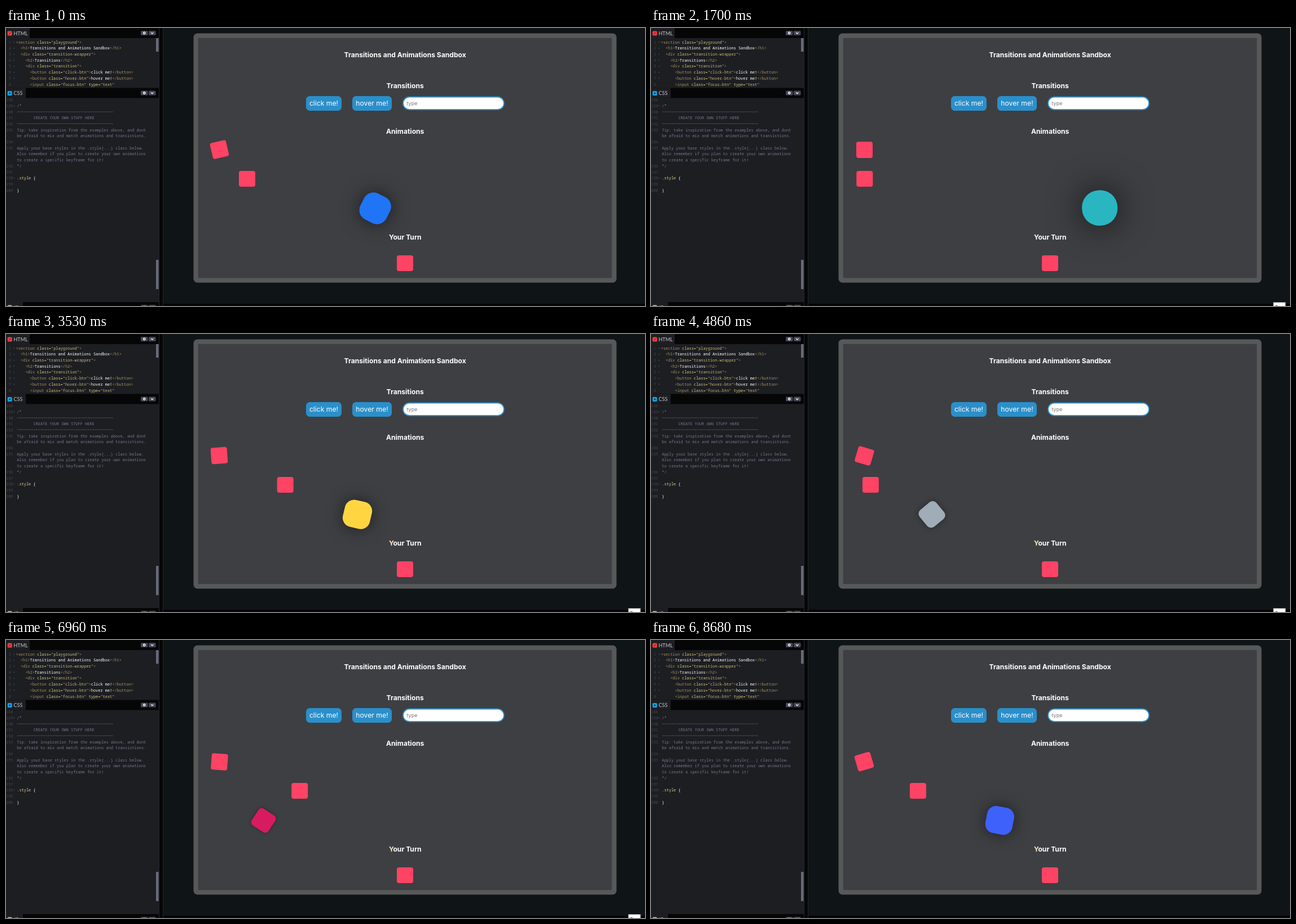
Animation of 1133 by 494 pixels, one loop 8.7 s. Source, as an HTML page:

```html
<!DOCTYPE html>
<html lang="en">
<head>
<meta charset="utf-8">
<title>Transitions and Animations Sandbox</title>
<style>
html, body { margin: 0; width: 100%; height: 100%; overflow: hidden; background: #0f1416; }
#stage { position: relative; width: 1133px; height: 494px; overflow: hidden; }
svg, pre, .sq { position: absolute; }
svg { left: 0; top: 0; }
pre { margin: 0; font: 6.94px/10.68px "Noto Sans Mono", monospace; color: #fff; }
.num { left: 0; width: 12px; text-align: right; color: #42454d; }
#htmlNum { width: 9px; }
#html, #htmlNum { top: 20.7px; }
#css, #cssNum { top: 123.3px; }
#html { left: 17.5px; }
#css { left: 19.3px; color: #717790; }
.tag { color: #a7925a; }
.attr, .sel { color: #ddca7e; }
.str { color: #c9b878; }
.plain { color: #fff; }
.sq { width: 28.5px; height: 28.5px; border-radius: 13%; background: #ff4365; }
text { font-family: Inter, sans-serif; fill: #fff; }
.head { font-weight: 700; font-size: 12.1px; text-anchor: middle; }
.btn { font-size: 12.2px; text-anchor: middle; }
.tab { font: 9px Lato, sans-serif; fill: #c8cad0; }
</style>
</head>
<body>
<div id="stage">
  <svg width="1133" height="494">
    <rect width="271" height="494" fill="#1d1e22"/>
    <rect x="271" width="8" height="494" fill="#060607"/>
    <rect x="271" width="1" height="494" fill="#24262b"/>
    <rect x="278" width="1" height="494" fill="#24262b"/>
    <rect x="279" y="490" width="854" height="4" fill="#070308"/>
    <g id="panels"></g>
    <rect x="266" y="18" width="4.5" height="24" fill="#676b7b"/>
    <rect x="266" y="412" width="4.5" height="52" fill="#676b7b"/>

    <rect x="332.5" y="9.5" width="750" height="443" rx="7" fill="#575958"/>
    <rect x="340.7" y="17.7" width="733.5" height="426.5" fill="#3e3f42"/>
    <text class="head" x="707.7" y="52">Transitions and Animations Sandbox</text>
    <text class="head" x="707.7" y="107">Transitions</text>
    <text class="head" x="707.7" y="187.5">Animations</text>
    <text class="head" x="707.7" y="375.5"><tspan id="initial">Y</tspan>our Turn</text>
    <rect x="532" y="121" width="63" height="26" rx="6.5" fill="#2b8fca"/>
    <rect x="614" y="121" width="70" height="26" rx="6.5" fill="#2b8fca"/>
    <text class="btn" x="563.5" y="138">click me!</text>
    <text class="btn" x="649" y="138">hover me!</text>
    <rect x="704" y="122.5" width="179" height="22.5" rx="11.2" fill="#fff" stroke="#2b8fca" stroke-width="1.8"/>
    <text x="710.5" y="137" font-size="9" style="fill:#757575">type</text>

    <g id="popup">
      <rect x="1103.5" y="487.5" width="21.5" height="8" fill="#fff" stroke="#777"/>
      <rect x="1107" y="493" width="4" height="1" fill="#555"/>
    </g>
  </svg>
  <pre class="num" id="htmlNum"></pre>
  <pre id="html"></pre>
  <pre class="num" id="cssNum"></pre>
  <pre id="css">

/*
~~~~~~~~~~~~~~~~~~~~~~~~~~~~~~~~~~~~~~~~~
       CREATE YOUR OWN STUFF HERE
~~~~~~~~~~~~~~~~~~~~~~~~~~~~~~~~~~~~~~~~~
Tip: take inspiration from the examples above, and dont
be afraid to mix and match animations and transistions.

Apply your base styles in the .style{...} class below.
Also remember if you plan to create your own animations
to create a specific keyframe for it!
*/

<span class="sel">.style</span> <span class="plain">{

}</span></pre>
  <div class="sq" id="spinner" style="left:364.3px;top:201.7px"></div>
  <div class="sq" id="slider" style="left:364.3px;top:253.7px"></div>
  <div class="sq" id="ball" style="left:364.3px;top:306px"></div>
  <div class="sq" style="left:693.2px;top:403.9px"></div>
</div>
<script>
const $ = id => document.getElementById(id);

// Editor panels: header bar, tab, icon and two small buttons
const panel = (name, y, tabWidth, color, glyph) => `
  <g transform="translate(0 ${y})">
    <rect width="271" height="18" fill="#060607"/>
    <rect width="${tabWidth}" height="18" fill="#1d1e22"/>
    <rect x="2.7" y="5.5" width="8" height="8" rx="1.5" fill="${color}"/>
    <path d="${glyph}" stroke="#1d1e22" fill="none"/>
    <text class="tab" x="13.5" y="12.8">${name}</text>
    <rect x="239" y="5" width="12.5" height="8" rx="1.5" fill="#444857"/>
    <rect x="253" y="5" width="12.5" height="8" rx="1.5" fill="#444857"/>
    <circle cx="245.2" cy="9" r="1.7" fill="none" stroke="#fff" stroke-width="1.4"/>
    <path d="M257 8l2.2 2.2 2.2-2.2" fill="none" stroke="#fff" stroke-width="1.2"/>
  </g>`;
const fold = y => `<path d="M13 ${y - 0.7}h2.6l-1.3 1.6z" fill="#555963"/>`;
const range = (from, to) => Array.from({ length: to - from + 1 }, (_, i) => from + i);

$('panels').innerHTML =
  panel('HTML', 0, 42, '#ff3c41', 'M5.5 11.5l2.5-4') +
  panel('CSS', 106.5, 35, '#0ea5f0', 'M5 9.5h3.4M6.7 7.8v3.4') +
  panel('JS', 487, 30, '#fcd000', 'M5 8v3M8 8v3') +
  range(1, 7).map(n => fold(14.8 + n * 10.68)).join('') +
  fold(138.5) + fold(266.7);

const markup = `<section class="playground">
  <h1>Transitions and Animations Sandbox</h1>
  <div class="transition-wrapper">
    <h2>Transitions</h2>
    <div class="transition">
      <button class="click-btn">click me!</button>
      <button class="hover-btn">hover me!</button>
      <input class="focus-btn" type="text"`;
const kinds = ['tag', 'attr', 'str'];
$('html').innerHTML = markup.replace(/(<\/?\w+|>)|(\w+=)|("[^"]*")/g, (m, ...groups) =>
  `<span class="${kinds[groups.findIndex((g, i) => i < 3 && g)]}">${m.replace('<', '&lt;')}</span>`);
$('htmlNum').textContent = range(1, 8).join('\n');
// Wrapped lines carry no number of their own
$('cssNum').textContent = range(188, 200)
  .map(n => n + '\n'.repeat({ 193: 2, 195: 3 }[n] || 1)).join('');

// Motion
const LOOP = 8.7;
const clamp = v => Math.min(1, Math.max(0, v));

function bezier(x1, y1, x2, y2) {
  const at = (s, a, b) => 3 * s * (1 - s) ** 2 * a + 3 * s * s * (1 - s) * b + s ** 3;
  return x => {
    let lo = 0, hi = 1;
    for (let i = 0; i < 24; i++) {
      const mid = (lo + hi) / 2;
      if (at(mid, x1, x2) < x) lo = mid; else hi = mid;
    }
    return at(lo, y1, y2);
  };
}
const easeInOut = bezier(0.42, 0, 0.58, 1);
const easeSpin = bezier(0.77, -0.05, 0.42, 1);

// time, red, green, blue
const colors = [
  [0, 31, 117, 245], [0.96, 48, 155, 217], [2.43, 34, 209, 170], [3.53, 255, 214, 66],
  [4.86, 160, 172, 183], [6.96, 216, 27, 96], [8.7, 60, 98, 253]
];
function colorAt(t) {
  const i = colors.findIndex(c => c[0] > t);
  const a = colors[i - 1], b = colors[i];
  const k = (t - a[0]) / (b[0] - a[0]);
  return `rgb(${[1, 2, 3].map(j => a[j] + (b[j] - a[j]) * k)})`;
}

function draw(t) {
  const cycle = ((t + 2.935) / 4.533) % 2;
  const s = cycle < 1 ? cycle : 2 - cycle;
  $('spinner').style.transform = `rotate(${360 * easeSpin(s)}deg)`;

  const x = 142.5 * easeInOut((t / 2.72 + 0.407) % 1);
  $('slider').style.transform = `translateX(${x}px)`;

  const ball = $('ball').style;
  ball.transform = `translateX(${427.7 * s}px) rotate(${180 * s}deg) scale(${1 + 1.2 * s})`;
  ball.borderRadius = `${13 + 37 * s}%`;
  ball.background = colorAt(t);
  ball.boxShadow = `0 0 ${28.5 * s}px rgba(0,0,0,${0.25 + 0.5 * s})`;

  $('popup').style.opacity = clamp((t - 0.9) / 0.25) * clamp((8.5 - t) / 0.2);
  $('initial').style.fill = t > 3 ? '#fbe6b4' : '#fff';
}

function tick(now) {
  draw((now / 1000) % LOOP);
  requestAnimationFrame(tick);
}
draw(0);
requestAnimationFrame(tick);
</script>
</body>
</html>
```
